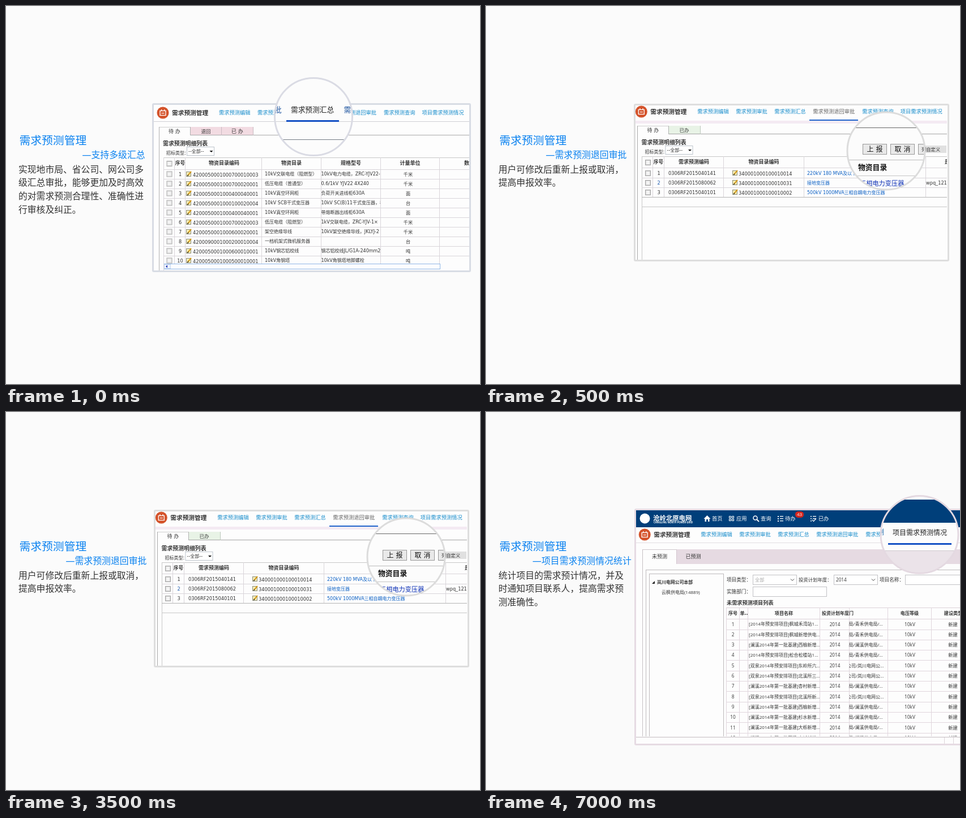
These frames come from a looping animation (837x669 px, 8000 ms). An HTML page with a canvas:

```html
<!DOCTYPE html>
<html lang="zh-CN">
<head>
<meta charset="utf-8">
<style>
html, body { margin: 0; width: 100%; height: 100%; overflow: hidden; background: #fbfbfb; }
canvas { display: block; }
</style>
</head>
<body>
<canvas id="stage" width="837" height="669"></canvas>
<script>
const ctx = document.getElementById('stage').getContext('2d');
const UI = '"Open Sans", "Noto Sans CJK SC", sans-serif';
const TABLE = '"DejaVu Sans", "Noto Sans CJK SC", sans-serif';
const INK = '#333', LINK = '#168ccb', BLUE = '#0a82f0', GRID = '#d9d5da';

function rect(x, y, w, h, fill) {
  ctx.fillStyle = fill;
  ctx.fillRect(x, y, w, h);
}

function box(x, y, w, h, stroke, fill) {
  if (fill) rect(x, y, w, h, fill);
  ctx.strokeStyle = stroke;
  ctx.lineWidth = 1;
  ctx.strokeRect(x + .5, y + .5, w - 1, h - 1);
}

const hLine = (x1, x2, y, color = GRID) => rect(x1, y, x2 - x1, 1, color);
const vLine = (x, y1, y2, color = GRID) => rect(x, y1, 1, y2 - y1, color);

function circle(x, y, r, fill) {
  ctx.beginPath();
  ctx.arc(x, y, r, 0, 7);
  ctx.fillStyle = fill;
  ctx.fill();
}

function path(points, { fill, stroke, width = 1 }) {
  ctx.beginPath();
  points.forEach(([x, y]) => ctx.lineTo(x, y));
  if (fill) { ctx.fillStyle = fill; ctx.fill(); }
  if (stroke) { ctx.strokeStyle = stroke; ctx.lineWidth = width; ctx.stroke(); }
}

// y is the vertical middle of the glyphs
function text(str, x, y, size, { color = INK, bold = false, align = 'left', font = TABLE } = {}) {
  ctx.font = `${bold ? 700 : 400} ${size}px ${font}`;
  ctx.textAlign = align;
  ctx.fillStyle = color;
  ctx.fillText(str, x, y + size * .37);
}

function clipped(shape, draw) {
  ctx.save();
  ctx.beginPath();
  shape();
  ctx.clip();
  draw();
  ctx.restore();
}

const inRect = (x, y, w, h, draw) => clipped(() => ctx.rect(x, y, w, h), draw);

function lens(x, y, ring, draw) {
  clipped(() => ctx.arc(x, y, 69, 0, 7), () => {
    rect(x - 70, y - 70, 140, 140, '#fcfcfc');
    draw();
  });
  ctx.beginPath();
  ctx.arc(x, y, 68.5, 0, 7);
  ctx.strokeStyle = ring;
  ctx.lineWidth = 3;
  ctx.stroke();
}

function caption(subtitle, x, lines) {
  text('需求预测管理', 23.5, 238, 19.8, { color: BLUE, font: UI });
  text(subtitle, x, 263.5, 15.9, { color: BLUE, font: UI });
  lines.forEach((line, i) => text(line, 22, 289 + i * 23.6, 15.8, { font: UI }));
}

function panel(x, y, w, h, border) {
  ctx.beginPath();
  ctx.roundRect(x, y, w, h, 3);
  ctx.fillStyle = border;
  ctx.fill();
  rect(x + 3, y + 3, w - 6, h - 6, '#fdfdfd');
}

function header(dx, y, active) {
  const cx = 277 + dx;
  circle(cx, y, 10.5, '#d4532b');
  ctx.strokeStyle = '#fff';
  ctx.lineWidth = 1.3;
  ctx.strokeRect(cx - 5, y - 3.5, 10, 8);
  rect(cx - 3, y - 6, 1.3, 3, '#fff');
  rect(cx + 2, y - 6, 1.3, 3, '#fff');
  rect(cx - 2.5, y, 5, 1.2, '#fff');
  text('需求预测管理', 293 + dx, y, 10.7, { bold: true });
  const items = [[376, '需求预测编辑'], [444, '需求预测审批'], [512, '需求预测汇总'],
    [580, '需求预测退回审批'], [667, '需求预测查询'], [734.5, '项目需求预测情况']];
  items.forEach(([x, label], i) =>
    text(label, x + dx, y, 9.25, { color: i === active ? '#666' : LINK }));
}

function listTop(dx, dy) {
  text('待 办', 287 + dx, 222 + dy, 9);
  text('需求预测明细列表', 277 + dx, 243.5 + dy, 9.9, { bold: true });
  text('招标类型:', 283 + dx, 260 + dy, 8);
  box(319 + dx, 249 + dy, 49, 16, '#bcc3cb', '#fff');
  text('--全部--', 322 + dx, 257 + dy, 8);
  const ax = 362.5 + dx, ay = 256 + dy;
  path([[ax - 3, ay], [ax + 3, ay], [ax, ay + 3]], { fill: '#111' });
}

function checkbox(x, y) {
  box(x - 5, y - 5, 10, 10, '#a5a5a5', '#f4f4f4');
  box(x - 4, y - 4, 8, 8, '#d5d5d5');
}

function noteIcon(x, y) {
  box(x, y - 4, 9, 9, '#8d8d78', '#f6efb8');
  path([[x + 3, y + 3], [x + 9, y - 4]], { stroke: '#d49a1c', width: 2 });
  path([[x + 2, y + 4], [x + 4, y + 2]], { stroke: '#333', width: 1.3 });
}

const head = (label, x, y, size = 9) => text(label, x, y, size, { bold: true, align: 'center' });

const SUMMARY_ROWS = [
  ['50001000700010003', '10kV交联电缆（阻燃型）', '10kV电力电缆，ZRC-YJV22-', '千米'],
  ['50001000700020001', '低压电缆（普通型）', '0.6/1kV YJV22 4X240', '千米'],
  ['50001000400040001', '10kV真空环网柜', '负荷开关进线柜630A', '面'],
  ['50001000100020004', '10kV SCB干式变压器', '10kV SC(B)11干式变压器，8', '台'],
  ['50001000400040001', '10kV真空环网柜', '带熔断器出线柜630A', '面'],
  ['50001000700020003', '低压电缆（阻燃型）', '1kV交联电缆，ZRC-YJV-1×', '千米'],
  ['50001000600020001', '架空绝缘导线', '10kV架空绝缘导线，JKLYJ-2', '千米'],
  ['90001000200010004', '一档机架式微机服务器', '', '台'],
  ['50001000600010001', '10kV钢芯铝绞线', '钢芯铝绞线JL/G1A-240mm2', '吨'],
  ['50001000500010001', '10kV角钢塔', '10kV角钢塔地脚螺栓', '吨'],
];

function summaryScene() {
  caption('—支持多级汇总', 134.5, ['实现地市局、省公司、网公司多',
    '级汇总审批，能够更加及时高效', '的对需求预测合理性、准确性进', '行审核及纠正。']);
  panel(258, 172, 563, 299, '#d8dce4');
  header(0, 189);
  hLine(261, 818, 204, '#cfcfd4');
  rect(326, 214, 54, 14, '#f2dbe2');
  rect(381, 214, 55, 14, '#f2dbe2');
  hLine(326, 818, 228, '#a9a9a9');
  hLine(270, 326, 214, '#cfcfcf');
  vLine(270, 214, 468, '#b0b0b0');
  vLine(325, 214, 229, '#b0b0b0');
  vLine(380, 214, 229, '#c9bcc2');
  vLine(436, 214, 229, '#c9bcc2');
  listTop(0, 0);
  text('退回', 344.5, 221.5, 8.5);
  text('已 办', 398, 222, 9);

  inRect(278, 268, 540, 188, () => {
    hLine(278, 818, 268, '#c8c8c8');
    hLine(278, 818, 289);
    [278, 297, 316, 451, 556, 661, 765].forEach(x => vLine(x, 268, 456));
    checkbox(288.5, 279);
    head('序号', 307.5, 278, 8.7);
    head('物资目录编码', 385, 278);
    head('物资目录', 504, 278);
    head('规格型号', 609, 278);
    head('计量单位', 713.5, 278);
    head('数量', 818, 278);
    SUMMARY_ROWS.forEach(([code, item, spec, unit], i) => {
      const y = 297.5 + i * 17;
      hLine(278, 818, Math.round(y + 8.5));
      checkbox(288.5, y);
      text(i + 1, 307.5, y, 8.2, { align: 'center' });
      noteIcon(318, Math.floor(y));
      text('42000' + code, 330, y + 1.5, 8.25);
      text(item, 457, y, 8);
      inRect(557, y - 8, 104, 16, () => text(spec, 556.5, y, 8));
      text(unit, 710, y, 8.2, { align: 'center' });
    });
  });
  box(278, 456, 489, 10, '#8fb6e6', '#fdfdff');
  box(279, 457, 12, 8, '#c5d7f0', '#edf3fd');
  path([[282, 461], [285, 458.5], [285, 463.5]], { fill: '#1c2fb0' });
  vLine(278, 456, 468);

  lens(543, 196, '#dadbe4', () => {
    hLine(473, 613, 204, '#d0d0d4');
    text('批', 474, 183, 12.7, { color: '#174f9c' });
    text('需求预测汇总', 503, 183, 12.7, { color: '#222' });
    text('需', 596.5, 183, 12.7, { color: '#174f9c' });
    rect(495, 202, 93, 3, '#1450c4');
    hLine(480, 606, 236, '#737b84');
  });
}

const RETURN_ROWS = [
  ['0306RF2015040141', '0014', '220kV 180 MVA及以下'],
  ['0306RF2015080062', '0031', '接地变压器'],
  ['0306RF2015040101', '0002', '500kV 1000MVA三相自耦电力变压器'],
];

function button(label, x, width) {
  box(x, 244, width, 19, '#989898', '#e9e9e9');
  text(label, x + width / 2, 254, 12, { align: 'center', color: '#111' });
}

function returnScene() {
  caption('—需求预测退回审批', 105.5, ['用户可修改后重新上报或取消，', '提高申报效率。']);
  panel(261, 173, 557, 279, '#dedede');
  header(-2.7, 187, 3);
  rect(264, 203, 550, 5, '#f4eaf3');
  rect(571, 201, 86, 2, '#2265cc');
  rect(323, 212, 55, 14, '#e8f3e6');
  hLine(322, 814, 226, '#a5a5a5');
  hLine(267, 322, 212, '#cfcfcf');
  vLine(267, 212, 449, '#aaa');
  vLine(322, 212, 227, '#b0b0b0');
  vLine(378, 212, 227, '#bcc8bc');
  listTop(-2.5, -2);
  text('已办', 341.5, 219.5, 8.5);

  inRect(275, 266, 539, 183, () => {
    hLine(275, 814, 266, '#c8c8c8');
    hLine(275, 814, 286);
    [294, 314, 419, 561, 776].forEach(x => vLine(x, 266, 338));
    vLine(275, 266, 449, '#c8c8c8');
    checkbox(286, 277);
    head('序号', 304.5, 276, 8.7);
    head('需求预测编码', 367, 276);
    head('物资目录编码', 490.5, 276);
    head('是否', 819, 276);
    RETURN_ROWS.forEach(([code, tail, item], i) => {
      const y = 296 + i * 17;
      hLine(275, 814, y + 8);
      checkbox(286, y);
      text(i + 1, 305, y, 8.2, { align: 'center', color: i === 1 ? '#1a58ac' : INK });
      text(code, 322, y, 8.25);
      noteIcon(435, y - 1);
      text('34000100010001' + tail, 446, y + 1, 8.25);
      text(item, 567, y, 8, { color: '#0a5fc4' });
    });
    text('wpq_1213', 777, 313, 8.2);
    hLine(275, 814, 338, '#b5b5b5');
    hLine(275, 814, 355, '#c8c8c8');
  });
  rect(764, 247, 49, 13, '#e0e0e0');
  text('列自定义', 769, 254, 8.3);

  lens(706.5, 256.5, '#dcdcdc', () => {
    hLine(636, 777, 215, '#666');
    button('上 报', 665, 43);
    button('取 消', 714, 43);
    button('', 763, 43);
    text('列', 769, 254, 8.3);
    hLine(636, 777, 272, '#bbb');
    text('物资目录', 657, 285, 12.8, { bold: true, color: '#111' });
    hLine(636, 777, 300, '#c6c6c6');
    text('三相电力变压器', 660, 313.5, 11.2, { color: '#0b2fb5' });
  });
}

const PRESET = '2014年预安排项目]', BATCH = '澜溪2014年第一批基建]';
const PROJECTS = [
  [PRESET + '枫城禾湾站1', '青禾'], [PRESET + '枫城新增供电', '青禾'],
  [BATCH + '西榆新增', '澜溪'], [PRESET + '松合松楼站1', '青禾'],
  ['双泉' + PRESET + '东岭所六', ''], ['双泉' + PRESET + '北溪所三', ''],
  [BATCH + '杏村新增', '澜溪'], ['双泉' + PRESET + '北溪所新', ''],
  [BATCH + '西榆新增', '澜溪'], [BATCH + '杉水新增', '澜溪'],
  [BATCH + '大栎新增', '澜溪'], [BATCH + '杏城新增', '澜溪'],
];

function topBar() {
  const white = { color: '#fff', font: UI };
  rect(265, 174, 572, 30, '#003f7a');
  circle(280.5, 188.5, 9, '#fff');
  text('沧岭北原电网', 295, 187.5, 11.4, { ...white, bold: true });
  text('CANGLING NORTH POWER GRID', 296, 195.5, 4.4, { ...white, bold: true });
  [[399, '首页'], [442, '应用'], [485, '查询'], [528, '待办'], [587, '已办']]
    .forEach(([x, label]) => text(label, x, 189, 9.3, white));
  path([[384.5, 189], [390.5, 183], [396.5, 189], [394.5, 189], [394.5, 194], [392, 194],
    [392, 190], [389, 190], [389, 194], [386.5, 194], [386.5, 189]], { fill: '#fff' });
  for (let i = 0; i < 4; i++) box(429 + i % 2 * 5, 184 + (i >> 1) * 5, 4, 4, '#fff');
  ctx.strokeStyle = '#fff';
  ctx.lineWidth = 1.5;
  ctx.beginPath();
  ctx.arc(475.5, 187.5, 3.5, 0, 7);
  ctx.stroke();
  path([[478, 190], [482, 194]], { stroke: '#fff', width: 1.8 });
  for (let y = 184; y < 194; y += 4) {
    rect(515, y, 2, 2, '#fff');
    rect(519, y, 6, 1.3, '#fff');
    rect(573, y, 2, 1.5, '#fff');
    if (y < 192) rect(577, y, 6, 1.3, '#fff');
  }
  path([[576, 191], [578.5, 193.5], [583, 188.5]], { stroke: '#fff', width: 1.2 });
  ctx.beginPath();
  ctx.roundRect(546, 176, 15, 11, 5);
  ctx.fillStyle = '#d3261f';
  ctx.fill();
  text('43', 553.5, 181.5, 8, { ...white, align: 'center' });
}

function field(x, y, width, value, color = INK) {
  box(x, y, width, 18, '#c2c2c6', '#fff');
  if (!value) return;
  text(value, x + 4, y + 9, 8.2, { color, font: UI });
  const ax = x + width - 8;
  path([[ax - 3, y + 7.5], [ax, y + 10.5], [ax + 3, y + 7.5]], { stroke: '#444' });
}

function statisticsScene() {
  const ui = { font: UI };
  caption('—项目需求预测情况统计', 82, ['统计项目的需求预计情况，并及', '时通知项目联系人，提高需求预', '测准确性。']);
  panel(262, 171, 590, 419, '#e6dbe3');
  topBar();
  header(3.2, 217);
  hLine(265, 837, 231, '#e2dee2');
  rect(337, 243, 500, 26, '#e6dae2');
  hLine(276, 337, 243, '#cfc8cc');
  vLine(276, 243, 574, '#c6c0c4');
  vLine(336, 243, 269, '#d3c8cf');
  text('未预测', 293, 256, 9, ui);
  text('已预测', 352.5, 256, 9, ui);
  hLine(282, 837, 279, '#bdb9bc');
  vLine(282, 279, 574, '#bdb9bc');
  box(288, 286, 132, 300, '#bdb9bc');
  path([[293, 304], [298, 304], [298, 299]], { fill: '#222' });
  text('岚川电网公司本部', 302, 301, 7.9, { bold: true, font: UI });
  text('云枫供电局(14889)', 310, 319, 8, ui);

  text('项目类型：', 425, 296.5, 8.6, ui);
  field(471, 288, 78, '全部', '#aaa');
  text('投资计划年度：', 552, 296.5, 8.4, ui);
  field(614, 288, 78, '2014');
  text('项目名称：', 695, 296.5, 8.6, ui);
  field(740, 288, 110);
  text('实施部门：', 425, 317.5, 8.6, ui);
  field(471, 309, 131);
  text('未需求预测项目列表', 425, 337.5, 9.2, { bold: true, font: UI });

  inRect(424, 346, 413, 228, () => {
    hLine(424, 837, 346, '#ddd2d9');
    hLine(424, 837, 366, '#ddd2d9');
    [424, 447, 462, 589, 641, 709, 786].forEach(x => vLine(x, 346, 574, '#e0d6dd'));
    head('序号', 436, 356, 8.1);
    head('单..', 455.5, 356, 8.1);
    head('项目名称', 526, 356, 8.1);
    head('投资计划年度门', 621, 356, 8);
    head('电压等级', 748, 356, 8.1);
    head('建设类型', 825, 356, 8.1);
    PROJECTS.forEach(([name, office], i) => {
      const y = 375.5 + i * 18.3;
      const middle = { align: 'center', font: UI };
      hLine(424, 837, Math.round(y + 9), '#e0d6dd');
      text(i + 1, 436, y, 8.2, middle);
      inRect(463, y - 8, 126, 16, () => text(`[${name}...`, 464, y, 8, ui));
      text('2014', 616, y, 8.2, middle);
      inRect(641, y - 8, 68, 16, () => office
        ? text(`局/${office}供电局/...`, 640.5, y, 8, ui)
        : text('公司/岚川电网公...', 637, y, 8, ui));
      text('10kV', 748.5, y, 8.3, middle);
      text('新建', 824.5, y, 8.3, middle);
    });
  });
  rect(265, 574, 572, 13, '#fdfdfd');
  hLine(265, 837, 575, '#c4bcc1');
  vLine(809, 576, 587, '#ddd5da');
  vLine(825, 576, 587, '#ddd5da');

  lens(765.5, 217, '#e4d9e1', () => {
    rect(695, 155, 142, 41, '#003f7a');
    rect(695, 246, 142, 42, '#ebe3e9');
    hLine(695, 837, 245, '#cfc8cd');
    text('测', 691, 213, 12, { color: '#1765a8' });
    text('项目需求预测情况', 718, 213.5, 12, { color: '#222' });
    rect(710, 232, 112, 3, '#1450c4');
  });
}

const LOOP = 8000;
const SCENES = [
  { until: 500, back: '#fbfbfb', draw: summaryScene },
  { until: 5500, back: '#fbfbfb', draw: returnScene },
  { until: LOOP, back: '#fafafa', draw: statisticsScene },
];
const start = performance.now();
let shown;

function tick() {
  const time = (performance.now() - start) % LOOP;
  const scene = SCENES.find(s => time < s.until);
  if (scene !== shown) {
    shown = scene;
    rect(0, 0, 837, 669, scene.back);
    scene.draw();
  }
  requestAnimationFrame(tick);
}
tick();
</script>
</body>
</html>
```
